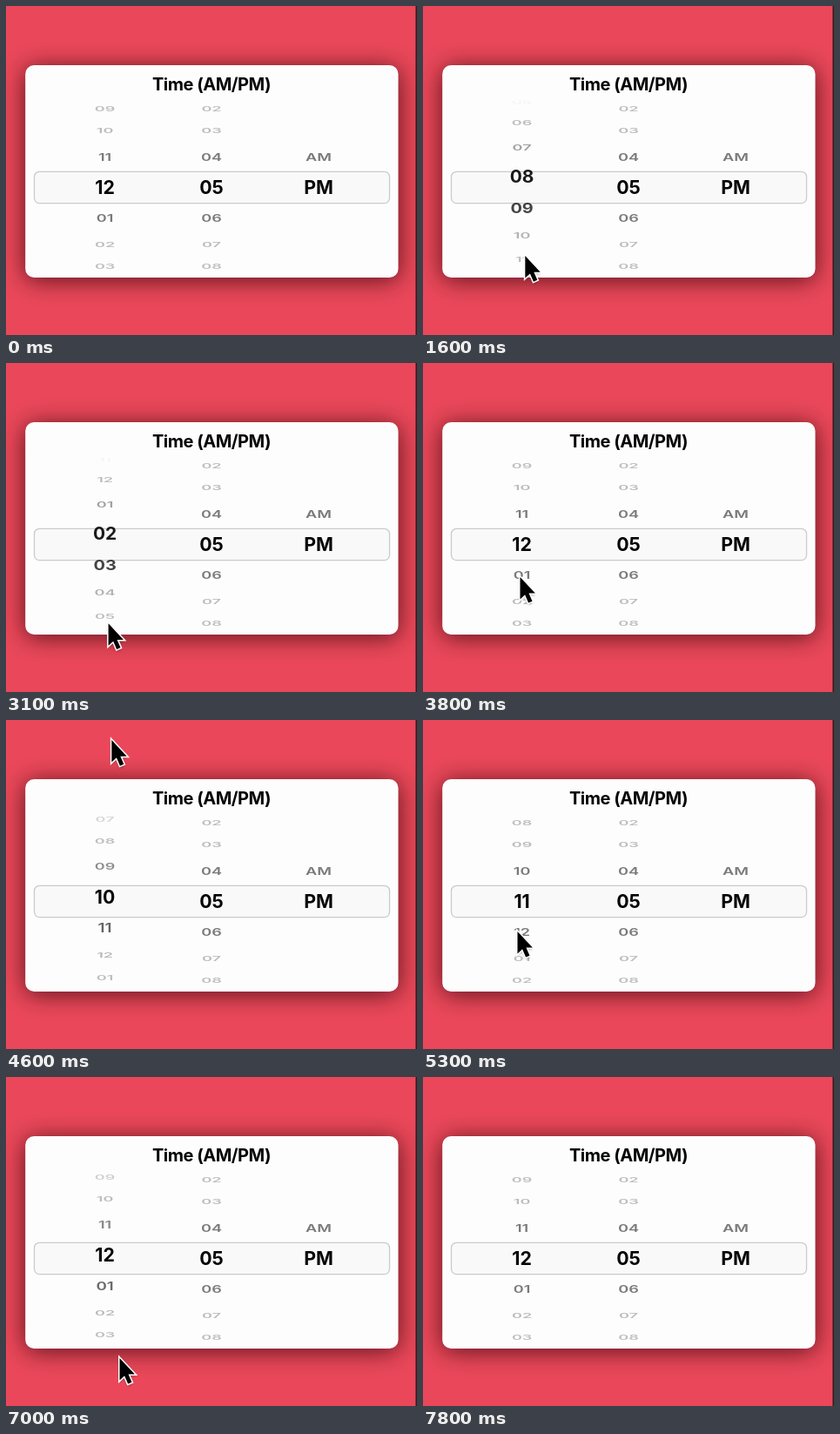
An HTML page for the animation above (8 s loop, 472 by 378 pixels).

```html
<!DOCTYPE html>
<html lang="en">
<head>
<meta charset="utf-8">
<title>Time picker</title>
<style>
html, body { margin: 0; width: 100%; height: 100%; overflow: hidden; background: #ea485a; }
svg { display: block; width: 472px; height: 378px; }
text { font-family: Inter, Roboto, "Liberation Sans", sans-serif; text-anchor: middle; fill: #060606; }
</style>
</head>
<body>
<svg viewBox="0 0 472 378">
  <defs>
    <filter id="blur" x="-20%" y="-30%" width="140%" height="160%"><feGaussianBlur stdDeviation="14"/></filter>
    <filter id="soft" x="-50%" y="-30%" width="200%" height="160%"><feGaussianBlur stdDeviation="1.5"/></filter>
    <clipPath id="view"><rect x="22" y="109" width="429" height="203"/></clipPath>
    <path id="arrow" d="M.5 3V28.5L6.1 23.3L10.1 32.6L14.5 30.7L10.5 21.6H17.9Z"/>
  </defs>
  <rect width="472" height="378" fill="#ea485a"/>
  <rect x="22" y="71" width="429" height="244" rx="10" fill="#2c060c" opacity=".75" filter="url(#blur)"/>
  <rect x="470.4" width="1.6" height="378" fill="#3a1a20"/>
  <rect x="22.2" y="68" width="428.3" height="244" rx="10" fill="#fdfdfd"/>
  <rect x="32.5" y="190.3" width="408" height="36.3" rx="6" fill="#f9f9f9" stroke="#cbcbcb" stroke-width="1.3"/>
  <text x="236" y="97" font-size="20" font-weight="700" letter-spacing="-.5">Time (AM/PM)</text>
  <g id="wheels" clip-path="url(#view)"></g>
  <g id="cursor">
    <use href="#arrow" y="2" fill="#000" opacity=".4" filter="url(#soft)"/>
    <use href="#arrow" fill="#000" stroke="#fff" stroke-width="3" paint-order="stroke"/>
  </g>
</svg>
<script>
const LOOP = 8000, MID = 208.7, SLOTS = 9, SPIN = 800;
const cursor = document.getElementById('cursor');
const wheels = document.getElementById('wheels');

// Each flick of the hour wheel: start time and rows turned
const FLICKS = [[1300, -6], [2800, -6], [4100, 11], [5400, 7], [6400, -6]];

// Each cursor move: start time, end time, x, y
const ENTRY = [478, 225];
const MOVES = [
  [100, 1000, 112, 128],
  [1300, 1720, 118, 322], [2100, 2460, 112, 155],
  [2800, 3200, 118, 322], [3400, 3800, 111, 243],
  [4100, 4450, 122, 0], [4450, 5300, 108, 240],
  [5400, 5750, 118, 112], [5750, 6200, 110, 148],
  [6400, 6800, 130, 320], [7250, 7650, 150, 392]
];

const clamp = v => Math.max(0, Math.min(1, v));
const smooth = u => u * u * (3 - 2 * u);
const flick = u => smooth(1 - (1 - u) ** 1.8);
const mod = (n, m) => ((n % m) + m) % m;
const pad = n => String(n).padStart(2, '0');

function hourAt(t) {
  return FLICKS.reduce((pos, [from, rows]) => pos + rows * flick(clamp((t - from) / SPIN)), 12);
}

function cursorAt(t) {
  return MOVES.reduce(([x, y], [from, to, toX, toY]) => {
    const p = smooth(clamp((t - from) / (to - from)));
    return [x + (toX - x) * p, y + (toY - y) * p];
  }, ENTRY);
}

// Rows flatten, shrink and fade with their distance k from the middle
function makeWheel(x, label) {
  const rows = Array.from({ length: SLOTS }, () => {
    const row = document.createElementNS('http://www.w3.org/2000/svg', 'text');
    row.setAttribute('font-size', 21.3);
    row.setAttribute('y', 7.7);
    return wheels.appendChild(row);
  });
  return pos => rows.forEach((row, n) => {
    const index = Math.round(pos) + n - (SLOTS >> 1);
    const d = index - pos, k = Math.abs(d);
    const y = MID + d * (37.7 - 2.5 * k);
    const width = 1 - .15 * Math.min(1, k * k);
    const height = .36 + .64 * Math.exp(-1.1 * k * k);
    const alpha = (.25 + .75 * Math.exp(-k * k)) * clamp((3.4 - k) / .4);
    row.textContent = label(index);
    row.setAttribute('transform', `translate(${x} ${y}) scale(${width} ${height})`);
    row.setAttribute('opacity', alpha);
    row.setAttribute('font-weight', k < .8 ? 700 : 600);
  });
}

const hours = makeWheel(113.6, i => pad(mod(i - 1, 12) + 1));
const minutes = makeWheel(236, i => pad(mod(i, 60)));
const halves = makeWheel(359, i => ['AM', 'PM'][i] || '');
minutes(5);
halves(1);

function draw(t) {
  hours(hourAt(t));
  cursor.setAttribute('transform', `translate(${cursorAt(t)})`);
}

const start = performance.now();
function tick() {
  draw((performance.now() - start) % LOOP);
  requestAnimationFrame(tick);
}
draw(0);
requestAnimationFrame(tick);
</script>
</body>
</html>
```
